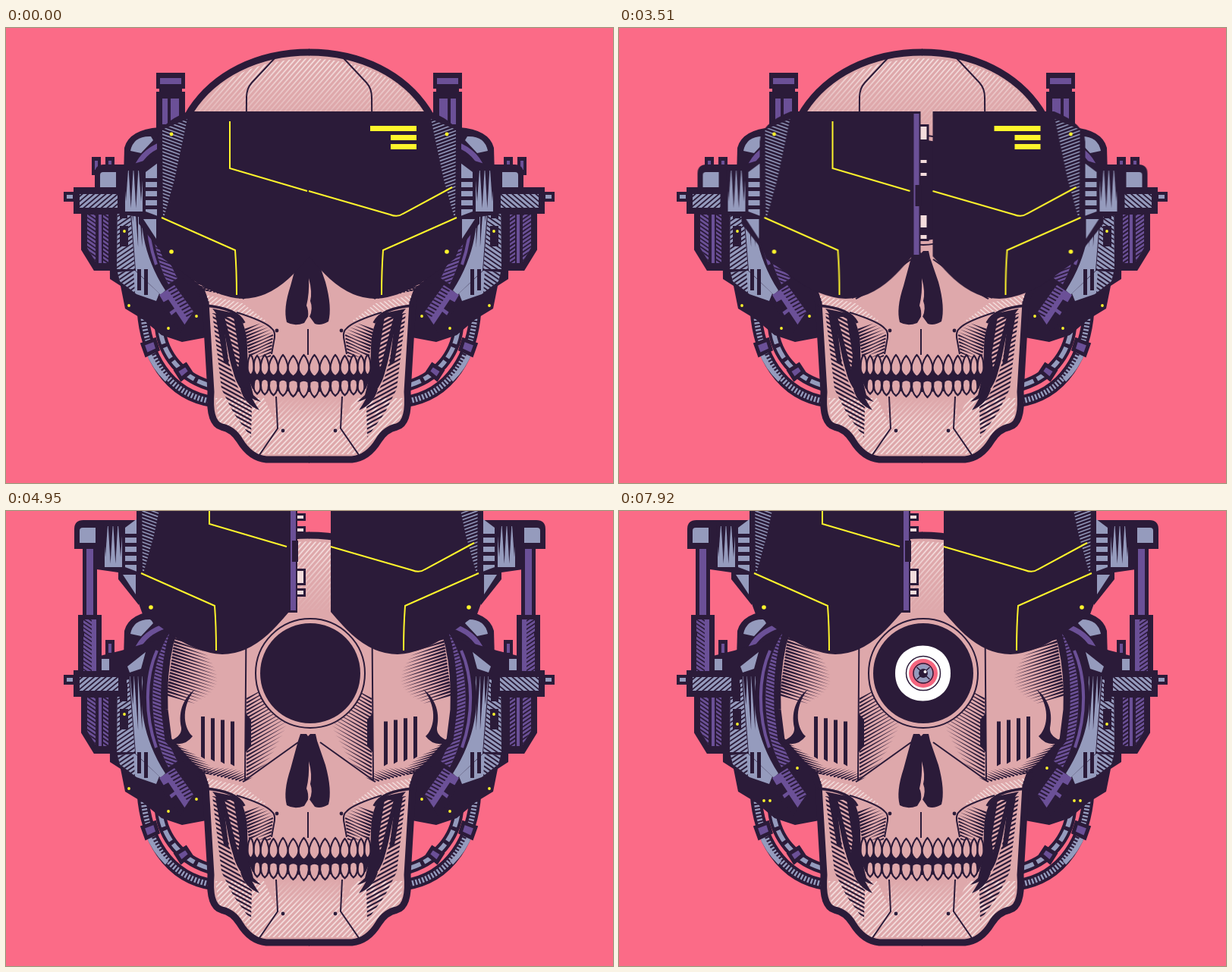
Animation, 800 px wide and 600 px high, one loop 8000 ms. Source, as an HTML page with a canvas:

```html
<!DOCTYPE html>
<html lang="en">
<head>
<meta charset="utf-8">
<title>Cyber skull</title>
<style>
html, body { margin: 0; width: 100%; height: 100%; overflow: hidden; background: #fb6b87; }
canvas { display: block; width: 800px; height: 600px; }
</style>
</head>
<body>
<canvas id="stage" width="800" height="600"></canvas>
<script>
const PINK = '#fb6b87', INK = '#2b1b39', BONE = '#dea8ab', PALE = '#f3dcdc';
const PURPLE = '#6b5097', STEEL = '#959bbd', YELLOW = '#fef52c';
const STEP = 90, LOOP = 8000;
const MIRROR = 799;

const stage = document.getElementById('stage').getContext('2d');
let g = stage;

// Drawing helpers
const fill = (color, d) => { g.fillStyle = color; g.fill(new Path2D(d)); };
const line = (color, w, d) => { g.strokeStyle = color; g.lineWidth = w; g.stroke(new Path2D(d)); };
const shape = (color, d, w = 5) => { fill(color, d); line(INK, w, d); };
const rect = (color, x, y, w, h) => { g.fillStyle = color; g.fillRect(x, y, w, h); };
const dot = (color, x, y, r) => { g.fillStyle = color; g.beginPath(); g.arc(x, y, r, 0, 7); g.fill(); };
const ring = (color, x, y, r, w) => {
  g.strokeStyle = color; g.lineWidth = w; g.beginPath(); g.arc(x, y, r, 0, 7); g.stroke();
};

function dashed(color, w, d, dash) {
  g.setLineDash(dash);
  line(color, w, d);
  g.setLineDash([]);
}

function hatch(d, color, angle, gap, w) {
  g.save();
  g.clip(new Path2D(d));
  const dx = Math.cos(angle) * 600, dy = Math.sin(angle) * 600;
  const step = gap / Math.abs(Math.cos(angle));
  g.strokeStyle = color;
  g.lineWidth = w;
  g.beginPath();
  for (let y = -700; y < 1300; y += step) {
    g.moveTo(400 - dx, y - dy);
    g.lineTo(400 + dx, y + dy);
  }
  g.stroke();
  g.restore();
}

// Tapered strokes whose roots run from (x0,y0) to (x1,y1); lengths swell to the middle
function spikes(color, x0, y0, x1, y1, n, lx, ly, w, swell = 0.5) {
  g.fillStyle = color;
  const len = Math.hypot(lx, ly), nx = -ly / len * w / 2, ny = lx / len * w / 2;
  for (let i = 0; i < n; i++) {
    const u = i / (n - 1), k = 1 - swell + swell * Math.sin(Math.PI * u);
    const x = x0 + (x1 - x0) * u, y = y0 + (y1 - y0) * u;
    g.beginPath();
    g.moveTo(x + nx, y + ny);
    g.lineTo(x + lx * k, y + ly * k);
    g.lineTo(x - nx, y - ny);
    g.fill();
  }
}

function fade(y0, a0, y1, a1) {
  const grad = g.createLinearGradient(0, y0, 0, y1);
  grad.addColorStop(0, `rgba(243,220,220,${a0})`);
  grad.addColorStop(1, `rgba(243,220,220,${a1})`);
  return grad;
}

function mirrored(draw) {
  g.save();
  g.translate(MIRROR, 0);
  g.scale(-1, 1);
  draw();
  g.restore();
}
const both = draw => { draw(); mirrored(draw); };

function layer(draw) {
  const c = document.createElement('canvas');
  c.width = 800;
  c.height = 600;
  g = c.getContext('2d');
  draw();
  g = stage;
  return c;
}

function cables() {
  const outer = 'M180 372C184 430 212 484 274 493';
  const inner = 'M203 396C207 430 230 462 274 473';
  line(INK, 15, outer);
  line(INK, 14, inner);
  line(STEEL, 7, outer);
  line(STEEL, 6, inner);
  dashed(INK, 8, outer, [2.2, 2.4]);
  line(STEEL, 6, 'M186 424Q195 448 212 464');
  dashed(INK, 7, inner, [5, 16]);
  shape(PURPLE, 'M180 417L196 411L200 424L185 431Z');
  shape(PURPLE, 'M224 452L237 444L243 453L231 463Z');
}

function antenna() {
  rect(INK, 198, 59, 38, 21);
  rect(INK, 202, 78, 30, 8);
  rect(INK, 198, 84, 38, 50);
  rect(PURPLE, 203, 66, 28, 8);
  rect(PURPLE, 206, 93, 7, 34);
  rect(PURPLE, 217, 93, 11, 34);
}

function housing() {
  fill(INK, 'M155 195L156 158Q162 134 202 131L226 145L210 200Z');
  fill(STEEL, 'M164 162Q168 142 191 143L194 148L178 165Z');
  line(PURPLE, 7, 'M172 184Q182 160 212 151');
  for (const x of [113, 131]) {
    rect(INK, x, 170, 12, 24);
    rect(PURPLE, x + 4, 175, 4, 12);
  }
  fill(INK, 'M120 192L152 184L205 168L224 148L252 160L258 350L264 408L232 414L205 405L180 384L157 370L151 340L137 331L136 240Z');
  rect(STEEL, 126, 195, 10, 15);
  fill(STEEL, 'M160 205L184 186L178 208L163 213Z');

  const band = 'M216 160C186 205 186 285 214 338L226 330C203 290 199 215 223 165Z';
  fill(PURPLE, band);
  hatch(band, INK, 0.35, 4.5, 1.8);
  line(PURPLE, 4, 'M199 184C183 220 183 270 198 312');

  fill(STEEL, 'M163 218L182 218C174 250 180 300 210 346L204 352L171 320Z');
  spikes(INK, 166, 218, 182, 218, 4, 3, 76, 5);
  const side = 'M147 224L162 222L170 318L146 318Z';
  fill(STEEL, side);
  hatch(side, INK, -0.6, 5, 1.8);
  rect(INK, 150, 229, 10, 22);
  rect(INK, 150, 261, 11, 27);
  fill(STEEL, 'M147 322L170 320L202 350L198 360L172 351L150 334Z');
  hatch('M147 322L168 320L170 350L150 334Z', INK, -0.6, 5, 2);
  rect(INK, 173, 318, 5, 28);
  rect(INK, 182, 318, 5, 34);

  fill(PURPLE, 'M202 352L222 339L247 374L230 399Z');
  hatch('M213 345L222 339L247 374L240 384Z', INK, -0.5, 5, 2);
  fill(INK, 'M203 364L214 358L222 370L212 377ZM214 382L224 374L236 392L230 402Z');

  shape(INK, 'M101 240L136 240L136 318L117 318L101 292Z', 4);
  const pack = 'M107 246L118 246L118 308L107 290Z';
  fill(PURPLE, pack);
  hatch(pack, INK, 0.6, 4.5, 1.8);
  rect(PURPLE, 122, 246, 4, 64);
  hatch('M128 246h7v64h-7Z', PURPLE, 0.6, 4.5, 2.4);

  rect(INK, 76, 216, 16, 13);
  rect(STEEL, 80, 220, 8, 5);
  rect(INK, 89, 210, 70, 35);
  const bar = 'M97 219L148 219L148 237L97 237Z';
  fill(STEEL, bar);
  hatch(bar, INK, -0.7, 5, 1.8);
}

const HALF_SKULL = 'M400 32C330 32 274 62 244 108C222 142 206 190 209 262L214 302L242 334L258 348L263 362L270 480' +
  'Q267 521 284 526Q299 529 308 544Q322 567 343 569L400 569';

function sheen() {
  hatch('M250 110C280 66 330 42 400 40C470 42 520 66 549 110L430 110L428 130L372 130L370 110Z',
    fade(50, 1, 125, 0.1), -0.85, 5, 1.8);
  hatch('M276 488L340 488L355 520L444 520L460 488L523 488L520 520L498 527L470 562L330 562L301 527L280 520Z',
    PALE, -0.8, 5, 1.8);
  hatch('M352 488L447 488L444 520L355 520Z', fade(488, 0, 520, 1), -0.8, 5, 1.8);
}

function face() {
  line(INK, 2, 'M354 40L324 72Q317 80 317 91L315 355L385 305');

  spikes(INK, 222, 168, 212, 242, 19, 62, 20, 2.8, 0.4);
  spikes(INK, 317, 248, 317, 348, 21, 56, -32, 2.1, 0.5);
  spikes(INK, 217, 306, 258, 344, 10, 30, 9, 2.4, 0.5);
  fill(INK, 'M249 235C228 262 236 289 246 297Q234 313 213 304Q232 298 231 286C226 262 236 245 249 235Z');
  fill(INK, 'M315 266L323 275L323 310L315 319Z');
  for (let i = 0; i < 4; i++) {
    const x = 257 + i * 13, y = 271 + i * 2.2;
    fill(INK, `M${x} ${y}h5v${56 + i}l-5 -3Z`);
  }

  // Cheek and jaw hollow
  spikes(INK, 254, 344, 312, 357, 13, 22, -10, 2.2, 0.4);
  hatch('M264 352L312 363L345 388L312 378L268 364Z', PALE, -0.7, 4.5, 1.5);
  line(INK, 3.5, 'M262 366Q304 369 314 389');
  const ramus = 'M272 376L286 378C289 430 298 474 324 500L323 540L300 508L284 476Z';
  hatch(ramus, INK, 0.5, 5, 2.2);
  fill(INK, 'M272 370L305 377Q317 392 318 420L319 456L326 484L336 493Q307 486 299 452C289 420 291 392 272 370Z');
  hatch('M288 381L300 381L308 432L306 450Z', BONE, 0.5, 5, 2.4);
  fill(INK, 'M276 378L286 384L294 446L287 440Z');
  fill(INK, 'M318 474Q324 490 334 504Q314 496 309 476Z');
  spikes(INK, 315, 398, 320, 432, 9, 34, -14, 2.6, 0.4);
  spikes(INK, 352, 405, 349, 432, 7, -22, 9, 2, 0.3);
  line(INK, 2, 'M304 375Q342 387 350 396Q355 400 354 408L350 430');
  line(INK, 2, 'M356 486L358 528L334 563');
  dot(INK, 357, 399, 2.4);
  dot(INK, 365, 531, 2.4);
}

function teeth() {
  fill(INK, 'M400 444L340 442L319 444L319 462L325 476L340 478L400 480Z');
  const edges = [0, 14, 28, 41, 53, 64, 73, 81];
  g.lineJoin = 'round';
  for (let i = 0; i < 7; i++) {
    const r = 399.5 - edges[i], l = 399.5 - edges[i + 1], m = (l + r) / 2;
    const top = 431 + (i % 2), bite = 460 - i * 0.4;
    shape(BONE, `M${m} ${top}C${m + 3} ${top + 3} ${r} 442 ${r} 448Q${r} 455 ${m} ${bite}` +
      `Q${l} 455 ${l} 448C${l} 442 ${m - 3} ${top + 3} ${m} ${top}Z`, 2.2);
    if (i > 5) continue;
    const tip = 487 - i * 0.9, gum = 465 - i * 0.4;
    shape(BONE, `M${l + 1} ${gum + 2}Q${m} ${gum - 3} ${r - 1} ${gum + 2}C${r + 1} 476 ${m + 4} ${tip - 3} ${m} ${tip}` +
      `C${m - 4} ${tip - 3} ${l - 1} 476 ${l + 1} ${gum + 2}Z`, 2.2);
  }
  g.lineJoin = 'miter';
}

function nose() {
  fill(INK, 'M388 294L396 294L398 297L401 294L408 294L410 303L421 335Q430 368 425 387Q415 393 407 390L399 379' +
    'L393 389Q380 394 370 388Q365 370 375 340L385 303Z');
  fill(BONE, 'M399 330Q404 348 401 360Q405 370 400 381L398 381Q399 372 396 366Q400 350 399 330Z');
}

function skull() {
  both(() => fill(BONE, HALF_SKULL + 'Z'));
  rect(BONE, 398, 37, 4, 530);
  sheen();
  both(() => { line(INK, 9, HALF_SKULL); face(); });
  both(teeth);
  nose();
  line(INK, 2, 'M398 397L398 431');
  dot(BONE, 401, 214, 72);
  ring(INK, 401, 214, 72, 2);
  dot(INK, 401, 214, 66);
}

// Sliding arm and visor, drawn in the closed position
function arm() {
  fill(INK, 'M117 218L117 192Q117 180 129 180L202 180L202 292L175 258L175 249L147 245L147 218Z');
  fill(STEEL, 'M124 194Q124 190 128 190L145 190L145 210L124 210Z');
  rect(STEEL, 157, 188, 23, 54);
  spikes(INK, 158, 187, 178, 187, 4, 0, 52, 6, 0.2);
  fill(STEEL, 'M184 190L200 178L200 248L184 242Z');
  for (let y = 198; y < 245; y += 12) rect(INK, 183, y, 18, 5);
  fill(STEEL, 'M181 252L198 252L198 278Z');
}

function visor() {
  fill(INK, 'M199 150Q200 126 240 110L400 110L400 301Q383 321 372 331Q343 357 312 357Q277 355 242 329L207 304L199 282Z');
  hatch('M206 134L239 120L222 200L207 254Z', STEEL, 0.35, 4.3, 1.5);
  dot(YELLOW, 218, 140, 2.4);
  dot(YELLOW, 218, 295, 2.8);
  line(YELLOW, 2, 'M205 250L302 293Q304 320 304 352');
}

function latch() {
  rect(INK, 399, 110, 12, 192);
  rect(PURPLE, 402, 113, 7, 186);
  rect(INK, 404, 207, 8, 28);
  for (const [y, h] of [[130, 17], [174, 4], [191, 4], [247, 16], [273, 5]]) {
    rect(INK, 409, y - 3, 13, h + 6);
    rect(PALE, 411, y, 8, h);
  }
}

const body = layer(() => {
  both(cables);
  both(antenna);
  both(housing);
  skull();
});
const leftRig = layer(() => {
  arm();
  latch();
  visor();
  line(YELLOW, 2, 'M295 123L295 185L397 215');
});
const rightRig = layer(() => {
  mirrored(() => { arm(); visor(); });
  line(YELLOW, 2, 'M399 215L506 246Q516 250 523 245L588 210');
  rect(YELLOW, 480, 129, 61, 7);
  rect(YELLOW, 507, 141, 34, 7);
  rect(YELLOW, 507, 153, 34, 7);
});

// Motion
const clamp = x => Math.min(1, Math.max(0, x));
const part = (t, a, b) => clamp((t - a) / (b - a));
const ease = x => x * x * (3 - 2 * x);

const LIGHTS = {
  A: [[156, 268], [162, 366], [214, 396], [251, 380]],
  B: [[156, 281], [235, 339], [191, 382], [199, 382]],
  C: [[156, 275], [162, 366], [226, 377], [256, 393]]
};
const ORDER = 'ABCABACACBAC';

function lights(t) {
  const set = LIGHTS[ORDER[Math.round(t / STEP) % ORDER.length]];
  both(() => set.forEach(([x, y]) => dot(YELLOW, x, y, 1.9)));
}

function piston(lift) {
  const rod = 218 - 168 * lift, sleeve = 200 - 63 * lift;
  g.save();
  g.beginPath();
  g.rect(90, 0, 36, 211);
  g.clip();
  rect(INK, 101, rod, 19, 92);
  rect(PURPLE, 106, rod, 9, 92);
  rect(INK, 95, sleeve, 31, 100);
  rect(PURPLE, 102, sleeve + 6, 17, 90);
  hatch(`M102 ${sleeve + 6}h11v90h-11Z`, INK, 0.6, 4.5, 1.6);
  rect(INK, 95, sleeve + 22, 8, 6);
  g.restore();
}

function eye(t) {
  const open = 36.5 * part(t, 5670, 6035);
  if (!open) return;
  const size = 1 + 0.75 * Math.sin(Math.PI * part(t, 6120, 6390));
  const iris = 1 - 0.25 * Math.sin(Math.PI * part(t, 7290, 7920));
  const cx = 36.5 * (0.5 + 0.5 * Math.max(0, (open - 27) / 9.5)), cy = open * 4 / 3;
  g.save();
  g.translate(400.5, 214);
  g.scale(size, size);
  const lids = new Path2D(`M-36.5 0C${-cx} ${-cy} ${cx} ${-cy} 36.5 0C${cx} ${cy} ${-cx} ${cy} -36.5 0Z`);
  g.fillStyle = '#fff';
  g.fill(lids);
  g.clip(lids);
  g.scale(iris, iris);
  ring(INK, 0.5, 0, 22.5, 1.5);
  dot('#f4657f', 0.5, 0, 19);
  ring(INK, 0.5, 0, 13, 1.5);
  dot(STEEL, 0.5, 0, 12);
  line(INK, 1.5, 'M-8 -8L9 8M-8 8L9 -8');
  dot(INK, 0.5, 0, 6);
  dot('#fff', 3, -2, 2);
  g.restore();
}

const start = performance.now();

function frame(now) {
  const t = Math.floor(Math.max(0, now - start) % LOOP / STEP) * STEP;
  const slide = (ease(part(t, 2700, 3150)) + ease(part(t, 3510, 3960))) / 2;
  const lift = ease(part(t, 4050, 4950));
  rect(PINK, 0, 0, 800, 600);
  g.drawImage(body, 0, 0);
  if (lift) both(() => piston(lift));
  eye(t);
  lights(t);
  g.drawImage(leftRig, -27 * slide, -168 * lift);
  g.drawImage(rightRig, 29 * slide, -168 * lift);
  requestAnimationFrame(frame);
}
requestAnimationFrame(frame);
</script>
</body>
</html>
```
